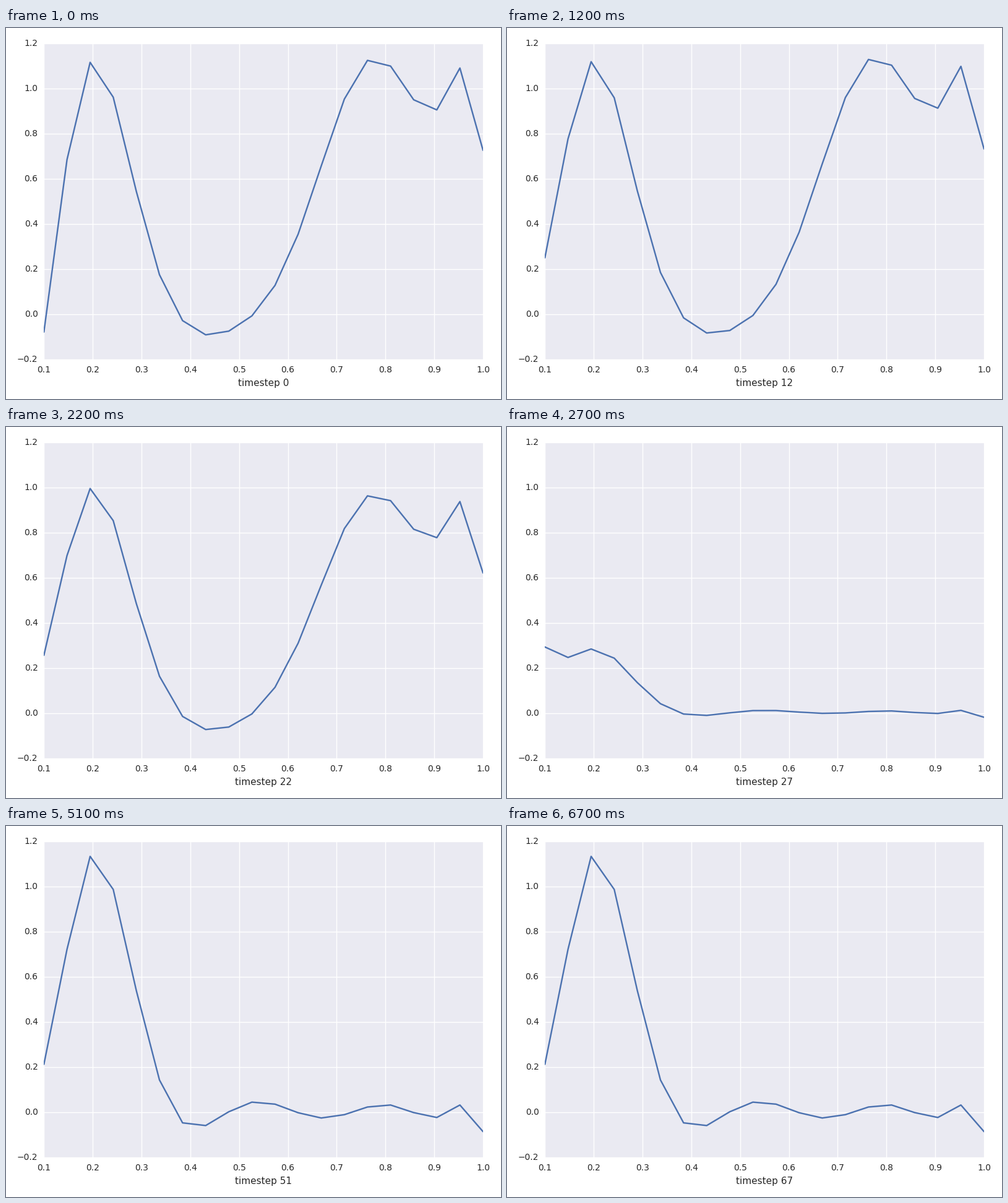
Recreate the animation shown at these times as a matplotlib script. Size 800 by 600 pixels, loop 6800 ms.

```python
import numpy as np
import matplotlib.pyplot as plt
from numpy.polynomial import Legendre
from matplotlib.animation import FuncAnimation

plt.rcParams["font.family"] = "DejaVu Sans"
INK = "#262626"

W, H, DPI = 800, 600, 100
LEFT, RIGHT, TOP, BOTTOM = 61.25, 770.95, 25.3, 536.3
STEPS, INTERVAL = 68, 100

X0, X1, N = 0.1, 1.0, 20
x = np.linspace(X0, X1, N)


def box(lo, hi, degree=9):
    """Unit box from lo to hi as a low-degree polynomial, ripples included."""
    t = np.linspace(X0, X1, 4001)
    inside = ((t >= lo) & (t <= hi)).astype(float)
    return Legendre.fit(t, inside, degree)(x)


def spike():
    """Peak at the left edge with a faint fading ripple."""
    i = np.arange(N)
    ripple = 0.016 * np.exp(-i / 9) * np.cos(2 * np.pi * (i - 3) / 5.8)
    return 0.409 * np.exp(-1.36 * i**2) + 0.008 - ripple


PARTS = np.array([box(0.140, 0.2955), box(0.639, X1), spike()])

# timestep: weights of left box, right box and spike
KEYS = {
    0: (1, 1, 0.32),
    2: (1, 1, 0.32),
    6: (0, 0, 1),
    12: (1, 1, 1.08),
    20.4: (1, 1, 1.08),
    27: (0.25, 0, 0.77),
    33: (1, 0, 0.85),
    56: (1, 0, 0.85),
    60: (0.25, 0, 0.77),
    63: (1, 0, 0.85),
    STEPS: (1, 0, 0.85),
}
TIMES = list(KEYS)
WEIGHTS = np.array(list(KEYS.values()), dtype=float)


def curve(step):
    pos = np.interp(step, TIMES, range(len(TIMES)))
    k = min(int(pos), len(TIMES) - 2)
    u = pos - k
    ease = u * u * (3 - 2 * u)
    return (WEIGHTS[k] + (WEIGHTS[k + 1] - WEIGHTS[k]) * ease) @ PARTS


fig = plt.figure(figsize=(W / DPI, H / DPI), dpi=DPI, facecolor="white")
ax = fig.add_axes([LEFT / W, 1 - BOTTOM / H,
                   (RIGHT - LEFT) / W, (BOTTOM - TOP) / H],
                  facecolor="#EAEAF2")
ax.set(xlim=(X0, X1), ylim=(-0.2, 1.2),
       xticks=np.arange(1, 11) / 10, yticks=np.arange(-1, 7) / 5)
ax.xaxis.set_major_formatter("{x:.1f}")
ax.set_yticklabels([f"{v / 5:.1f}".replace("-", "\u2212")
                    for v in range(-1, 7)])
ax.tick_params(length=0, pad=7, labelsize=10, labelcolor=INK)
plt.setp(ax.get_yticklabels(), va="center")
ax.set_axisbelow(True)
ax.grid(color="white", linewidth=1)
ax.spines[:].set_visible(False)

line, = ax.plot(x, curve(0), color="#4C72B0", lw=1.75,
                solid_capstyle="round", solid_joinstyle="round")
label = fig.text((LEFT + RIGHT) / 2 / W, 1 - 579 / H, "timestep 0",
                 fontsize=11, color=INK, ha="center", va="baseline")


def update(step):
    line.set_ydata(curve(step))
    label.set_text(f"timestep {step}")
    return line, label


anim = FuncAnimation(fig, update, frames=STEPS, interval=INTERVAL,
                     init_func=lambda: update(0), repeat=True,
                     repeat_delay=0, blit=False)
plt.show()
```
